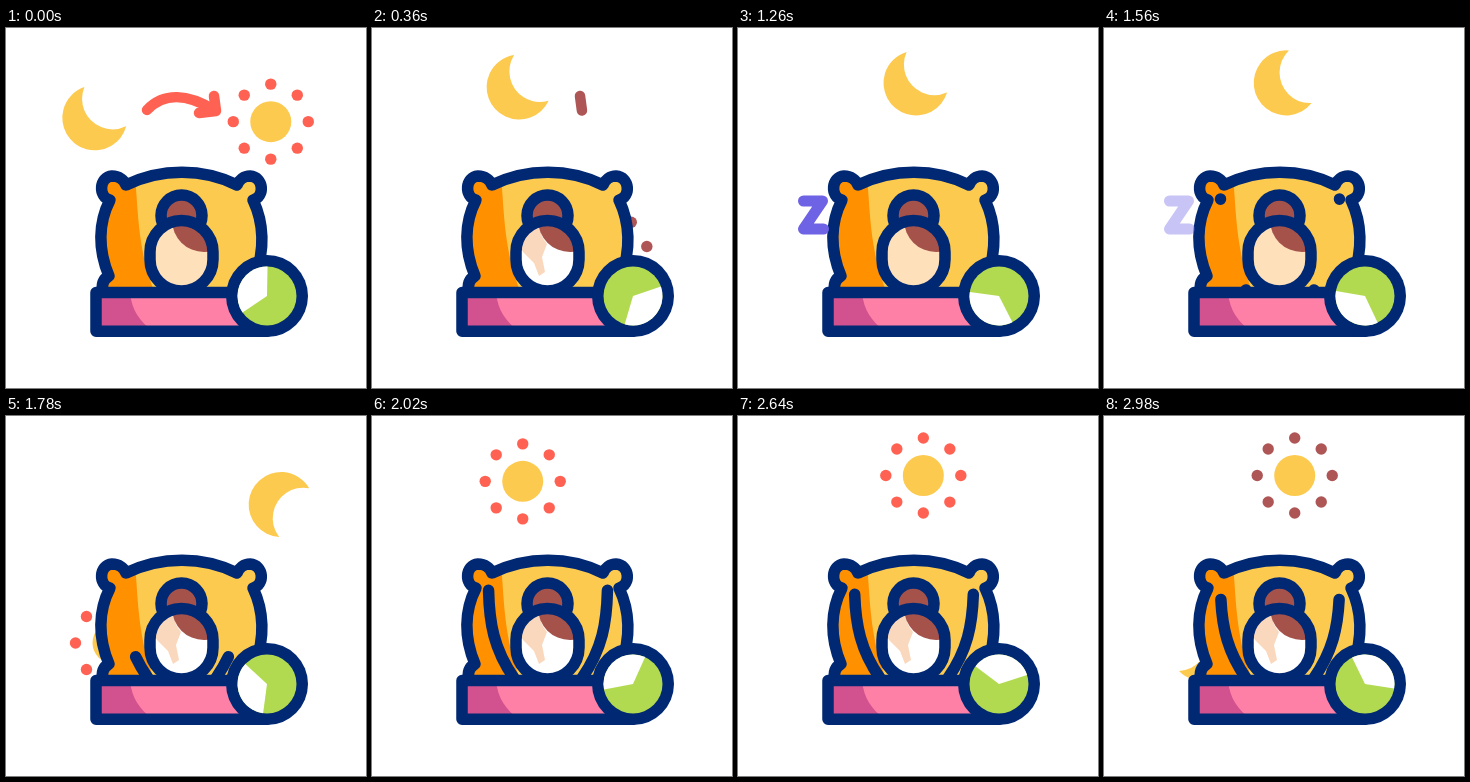
Animation, 360 px wide and 360 px high, one loop 3 s. Source, as an HTML page with a canvas:

```html
<!DOCTYPE html>
<html lang="en">
<head>
<meta charset="utf-8">
<title>Sleep cycle</title>
<style>
html, body { margin: 0; width: 100%; height: 100%; overflow: hidden; background: #fff; }
canvas { display: block; width: 360px; height: 360px; }
</style>
</head>
<body>
<canvas id="stage"></canvas>
<script>
const LOOP = 3000, RAD = Math.PI / 180, TAU = Math.PI * 2;
const NAVY = '#002873', YELLOW = '#fdca50', ORANGE = '#ff9100', RED = '#ff6252',
      DULL = '#ae5555', HAIR = '#a5524b', SKIN = '#fee0bb', VIOLET = '#6e62e5';

const canvas = document.getElementById('stage');
const dpr = window.devicePixelRatio || 1;
canvas.width = canvas.height = 360 * dpr;
const c = canvas.getContext('2d');

const shape = build => {
  const path = new Path2D();
  build(path);
  return path;
};
const bun = shape(p => p.arc(175.5, 187.5, 20.5, 0, TAU));
const face = shape(p => p.roundRect(144, 192.5, 63, 70.5, 31.5));
const fringe = shape(p => p.arc(198, 192, 32, 0, TAU));
const blanket = shape(p => p.rect(90, 264.5, 171, 38.8));
const pillow = new Path2D(
  'M97 266 C95 257 97 251 103 248 C92 222 92 195 104 172 ' +
  'C92 169 93 149 106 148 C113 148 118 152 120 157 ' +
  'C155 140 197 140 231 157 C233 152 238 148 244 148 ' +
  'C258 149 259 169 247 172 C258 195 259 222 249 248 V266 Z');
const pillowShade = new Path2D('M80 130 H126 C134 165 127 215 151 270 H80 Z');
const blanketShade = new Path2D('M89 265 H124 C126 282 133 293 148 304 H89 Z');
const cheek = new Path2D('M140 205 L167 193 Q167 207 175 216 L170 229 L173 244 L167 248 L162 235 L151 224 Z');
const arm = new Path2D('M142 262 C121 232 117 205 116.5 171');
const shaft = new Path2D('M208 82 C182 66 158 64 141 82');
const tip = new Path2D('M208 68 L210 83 L193 85');
const zed = new Path2D('M-10 -14 H9 L-10 14 H10');

const clamp = x => Math.max(0, Math.min(1, x));
const ease = x => x < .5 ? 4 * x ** 3 : 1 - 4 * (1 - x) ** 3;
const ramp = (t, from, to) => ease(clamp((t - from) / (to - from)));
const swing = t => 195 * ramp(t, 1440, 2250);
const settle = t => ramp(t, 2260, 2980);

// A point on a slightly uneven ring around the pillow.
function orbit(deg, base, s1, c1, s2, c2) {
  const a = deg * RAD;
  const r = base + s1 * Math.sin(a) + c1 * Math.cos(a) + s2 * Math.sin(2 * a) + c2 * Math.cos(2 * a);
  return [178 + r * Math.cos(a), 150 + r * Math.sin(a)];
}

function disc(x, y, r, color) {
  c.fillStyle = color;
  c.beginPath();
  c.arc(x, y, r, 0, TAU);
  c.fill();
}
function line(path, color = NAVY, width = 11.5) {
  c.strokeStyle = color;
  c.lineWidth = width;
  c.stroke(path);
}
// Strokes a path with its far end cut back by the share gone.
function trimmed(path, length, gone, color, width) {
  if (gone >= 1) return;
  c.setLineDash([length, length]);
  c.lineDashOffset = gone * length;
  line(path, color, width);
  c.setLineDash([]);
}
function outlined(base, color, ...layers) {
  c.save();
  c.clip(base);
  c.fillStyle = color;
  c.fill(base);
  for (const [path, tone] of layers) {
    c.fillStyle = tone;
    c.fill(path);
  }
  c.restore();
  line(base);
}

function drawMoon(t) {
  const deg = -146 + 56 * ramp(t, 0, 640) + swing(t) + 29 * settle(t);
  const sway = 35 * (1 - ramp(t, 0, 580)) - 19 * (ramp(t, 760, 1260) - ramp(t, 1260, 1560));
  c.save();
  c.translate(...orbit(deg, 112, 8, 4, 0, 9));
  c.rotate((deg + 64 + sway) * RAD);
  c.fillStyle = YELLOW;
  c.beginPath();
  c.arc(0, 0, 32.5, 62 * RAD, -62 * RAD);
  c.arc(26, 0, 30.5, -111 * RAD, 111 * RAD, true);
  c.fill();
  c.restore();
}

function drawSun(t, color) {
  const deg = -33 + 108 * ramp(t, 0, 580) + swing(t) + 8 * settle(t);
  const turn = -11 * (ramp(t, 0, 480) - ramp(t, 1440, 1780));
  const [x, y] = orbit(deg, 99, 3, 0, -4, 6);
  disc(x, y, 20.5, YELLOW);
  for (let i = 0; i < 8; i++) {
    const a = (turn + i * 45) * RAD;
    disc(x + 37.5 * Math.cos(a), y + 37.5 * Math.sin(a), 5.7, color);
  }
}

function drawArrow(t, color) {
  trimmed(shaft, 76, clamp(t / 310), color, 10.5);
  trimmed(tip, 33, clamp((t - 260) / 180), color, 10.5);
}

function drawArms(t) {
  const gone = 1 - ramp(t, 1540, 2140) + .125 * settle(t);
  trimmed(arm, 96, gone);
  c.save();
  c.translate(352, 0);
  c.scale(-1, 1);
  trimmed(arm, 96, gone);
  c.restore();
}

function drawHead(t, early) {
  const pale = early || t >= 1640;
  outlined(bun, HAIR);
  outlined(face, pale ? '#fff' : SKIN, [cheek, pale ? '#fad8bd' : SKIN], [fringe, HAIR]);
}

function drawZed(t) {
  const p = clamp((t - 620) / 640), out = 1 - (1 - p) ** 2;
  const size = .66 + .34 * out;
  c.save();
  c.globalAlpha = clamp((t - 620) / 120) * clamp((1620 - t) / 160);
  c.translate(157 - 81.5 * out, 240 - 53 * out);
  c.scale(size, size);
  line(zed, VIOLET, 11);
  c.restore();
}

function drawClock(t) {
  const start = (146 + 277 * ramp(t, 0, 620) + .6 * swing(t) + 64 * settle(t)) * RAD;
  disc(261, 268, 41, NAVY);
  disc(261, 268, 29.5, '#b2da51');
  c.fillStyle = '#fff';
  c.beginPath();
  c.moveTo(261, 268);
  c.arc(261, 268, 29.5, start, start + 125 * RAD);
  c.fill();
}

function draw(t) {
  c.setTransform(dpr, 0, 0, dpr, 0, 0);
  c.fillStyle = '#fff';
  c.fillRect(0, 0, 360, 360);
  c.lineCap = c.lineJoin = 'round';
  const early = t > 180 && t < 600;
  const red = early || t >= 2720 ? DULL : RED;
  drawSun(t, red);
  drawMoon(t);
  drawArrow(t, red);
  outlined(pillow, YELLOW, [pillowShade, ORANGE]);
  drawArms(t);
  drawZed(t);
  drawHead(t, early);
  outlined(blanket, '#ff80a6', [blanketShade, '#d2528f']);
  drawClock(t);
}

let began;
function tick(now) {
  if (began === undefined) began = now;
  draw((now - began) % LOOP);
  requestAnimationFrame(tick);
}
draw(0);
requestAnimationFrame(tick);
</script>
</body>
</html>
```
